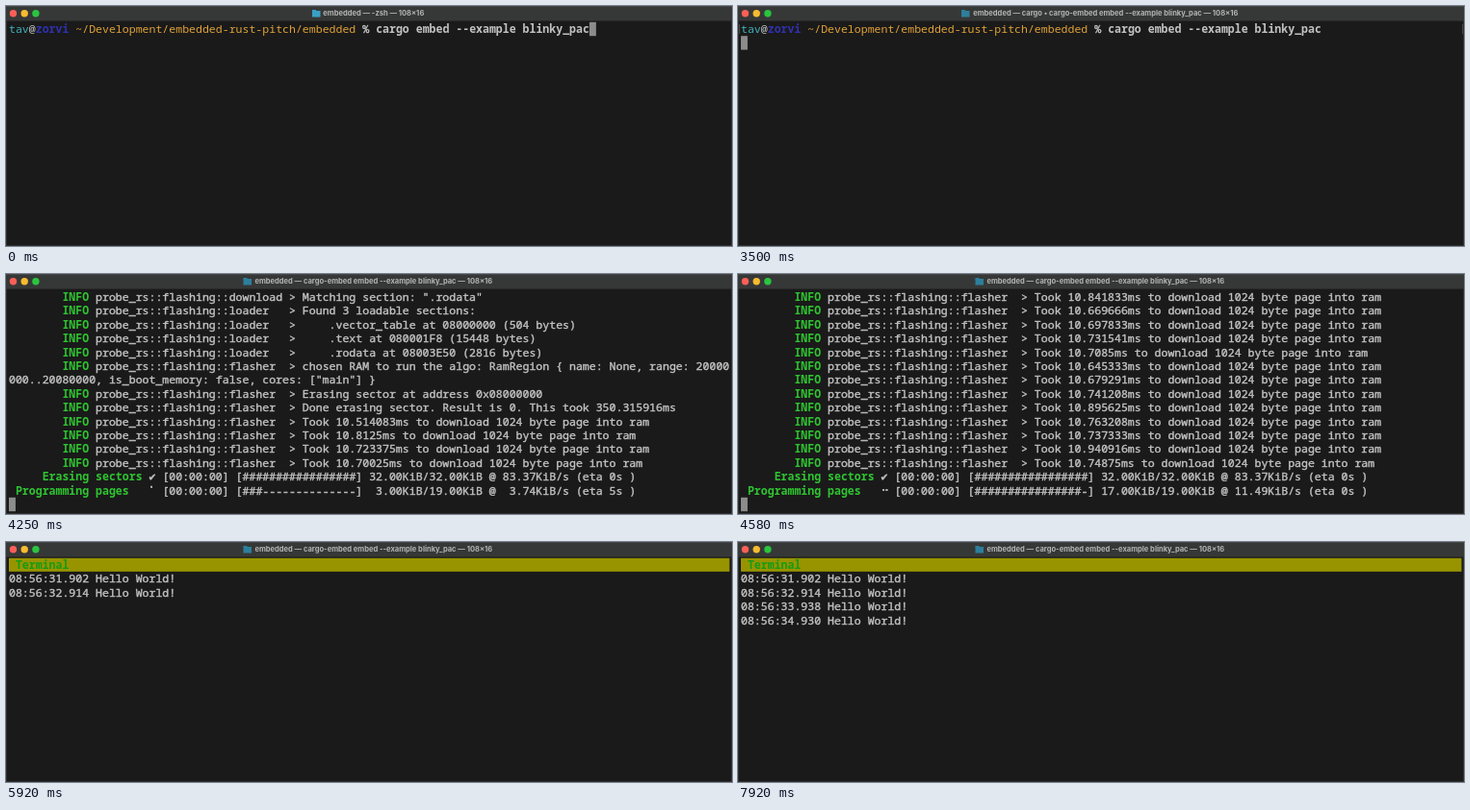
Recreate the animation shown at these times as an HTML page with a canvas. Size 754x250 px, loop 8000 ms.

```html
<!DOCTYPE html>
<html lang="en">
<head>
<meta charset="utf-8">
<title>Terminal session</title>
<style>
html, body { margin: 0; width: 100%; height: 100%; overflow: hidden; background: #1a1a1a; }
canvas { display: block; width: 754px; height: 250px; }
</style>
</head>
<body>
<canvas id="stage"></canvas>
<script>
const W = 754, H = 250, LOOP = 8000;
const ROWS = 16, LEFT = 3, TOP = 16.8, CELL = 6.93, LINE = 14.4;
const MONO = CELL / 0.6 + 'px "Noto Sans Mono", "DejaVu Sans Mono", monospace';
const C = {
  back: '#1a1a1a', bar: '#363837', text: '#c2c2c2', cursor: '#8c8c8c',
  user: '#3fb2bb', host: '#3030ae', path: '#e0a238', green: '#2fc431',
  olive: '#989400', head: '#149c14', title: '#b2b4b3'
};

const canvas = document.getElementById('stage');
const ctx = canvas.getContext('2d');
const dpr = window.devicePixelRatio || 1;
canvas.width = W * dpr;
canvas.height = H * dpr;

const seg = (text, color = C.text, weight = 500) => ({ text, color, weight });
const plain = text => [seg(text)];
const label = (name, width, rest) => [seg(name.padStart(width), C.green, 700), seg(rest)];
const info = (module, message) =>
  label('INFO', 12, ' ' + ('probe_rs::flashing::' + module).padEnd(28) + ' > ' + message);
const clamp = (v, lo, hi) => Math.max(lo, Math.min(hi, v));

const prompt = [
  seg('tav', C.user, 400), seg('@', C.text, 400), seg('zorvi', C.host, 700),
  seg(' ~/Development/embedded-rust-pitch/embedded', C.path, 400),
  seg(' % '), seg('cargo embed --example blinky_pac', C.text, 700)
];
const promptLength = prompt.reduce((n, s) => n + s.text.length, 0);

const log = [
  [3580, label('Finished', 12, ' dev [unoptimized + debuginfo] target(s) in 0.03s')],
  [3580, label('Config', 12, ' default')],
  [3580, label('Target', 12, ' target/thumbv7em-none-eabihf/debug/examples/blinky_pac')],
  [3665, info('download', 'Matching section: ".vector_table"')],
  [3665, info('download', 'Matching section: ".text"')],
  [3665, info('download', 'Matching section: ".rodata"')],
  [3665, info('loader', 'Found 3 loadable sections:')],
  [3665, info('loader', '    .vector_table at 08000000 (504 bytes)')],
  [3665, info('loader', '    .text at 080001F8 (15448 bytes)')],
  [3665, info('loader', '    .rodata at 08003E50 (2816 bytes)')],
  [3748, info('flasher', 'chosen RAM to run the algo: RamRegion { name: None, range: 20000')],
  [3748, plain('000..20080000, is_boot_memory: false, cores: ["main"] }')],
  [3748, info('flasher', 'Erasing sector at address 0x08000000')],
  [4080, info('flasher', 'Done erasing sector. Result is 0. This took 350.315916ms')]
];
const pageTimes = [
  10.514083, 10.8125, 10.723375, 10.70025, 10.688708, 10.841833, 10.669666,
  10.697833, 10.731541, 10.7085, 10.645333, 10.679291, 10.741208, 10.895625,
  10.763208, 10.737333, 10.940916, 10.74875, 10.712583, 10.726041
];
const hello = [
  [4830, '08:56:31.902'], [5670, '08:56:32.914'],
  [6750, '08:56:33.938'], [7750, '08:56:34.930']
];

function drawRow(row, segments) {
  const y = TOP + row * LINE + 11.2;
  let col = 0;
  for (const { text, color, weight } of segments) {
    const x = LEFT + col * CELL;
    ctx.font = (weight === 700 ? 700 : 400) + ' ' + MONO;
    ctx.fillStyle = ctx.strokeStyle = color;
    ctx.fillText(text, x, y);
    if (weight === 500) {
      // a thin outline gives the medium weight
      ctx.lineWidth = 0.4;
      ctx.lineJoin = 'round';
      ctx.strokeText(text, x, y);
    }
    col += text.length;
  }
}

function drawCursor(row, col) {
  ctx.fillStyle = C.cursor;
  ctx.fillRect(LEFT + col * CELL, TOP + row * LINE, CELL, LINE);
}

function drawTitle(text, iconX, iconColor) {
  ctx.fillStyle = C.bar;
  ctx.fillRect(0, 0, W, 15.5);
  ctx.fillStyle = '#4b4d4c';
  ctx.fillRect(0, 0, W, 0.7);
  ['#fb5f57', '#f8bb2f', '#2ac440'].forEach((color, i) => {
    ctx.fillStyle = color;
    ctx.beginPath();
    ctx.arc(7.5 + i * 11.7, 7.7, 3.7, 0, Math.PI * 2);
    ctx.fill();
  });
  ctx.fillStyle = iconColor;
  ctx.fillRect(iconX, 4, 4, 2);
  ctx.fillRect(iconX, 5, 8.5, 6.5);
  ctx.font = '700 7.55px Inter, sans-serif';
  ctx.fillStyle = C.title;
  ctx.textAlign = 'center';
  ctx.fillText(text, 381.8, 10.4);
  ctx.textAlign = 'left';
}

function progress(name, width, mark, done, total, rate, eta) {
  const part = done / total * 17;
  const filled = done ? Math.min(17, Math.floor(part) + 1) : 0;
  const size = n => n.toFixed(2).padStart(5) + 'KiB';
  const status = `${size(done)}/${size(total)} @ ${size(rate)}/s (eta ${eta}s )`;
  return [
    ...label(name, width, ' '.repeat(21 - width)),
    seg(mark),
    seg(` [00:00:00] [${'#'.repeat(filled).padEnd(17, '-')}] ${status}`)
  ];
}

function drawFlashing(t) {
  const step = Math.floor((t - 4249) / 82.5);
  const pages = clamp(Math.round(3 + 3.5 * step), 0, 19);
  const rows = [prompt, ...log.filter(([at]) => t >= at).map(([, line]) => line)];
  if (step >= -1) {
    for (const ms of pageTimes.slice(0, pages + 1)) {
      rows.push(info('flasher', `Took ${ms}ms to download 1024 byte page into ram`));
    }
  }
  if (t >= 3748) {
    const erased = Math.round(32 * clamp((t - 3748) / 332, 0, 1));
    const rate = pages ? 3.74 + (pages - 3) * 7.75 / 14 : 0;
    const eta = pages ? Math.floor((19 - pages) / rate + 0.8) : 0;
    const spin = '⠁⠁⠉⠙⠚⠒⠂'[clamp(step + 1, 0, 6)];
    rows.push(progress('Erasing sectors', 20, erased < 32 ? '⠁' : '✔', erased, 32, 83.37, 0));
    rows.push(progress('Programming pages', 18, spin, pages, 19, rate, eta));
  }
  const view = rows.slice(-(ROWS - 1));
  view.forEach((line, i) => drawRow(i, line));
  drawCursor(view.length, 0);
  if (view[0] === prompt) {
    ctx.fillStyle = '#505050';
    ctx.fillRect(1, 19, 0.8, 10);
    ctx.fillRect(752, 19, 0.8, 10);
  }
}

function drawMonitor(t) {
  ctx.fillStyle = C.olive;
  ctx.fillRect(LEFT, TOP, 108 * CELL, LINE - 0.4);
  drawRow(0, [seg(' Terminal', C.head, 700)]);
  hello.forEach(([at, stamp], i) => {
    if (t >= at) drawRow(i + 1, plain(stamp + ' Hello World!'));
  });
}

function draw(t) {
  ctx.setTransform(dpr, 0, 0, dpr, 0, 0);
  ctx.fillStyle = C.back;
  ctx.fillRect(0, 0, W, H);

  const command = 'cargo-embed embed --example blinky_pac — 108×16';
  if (t < 3500) drawTitle('embedded — -zsh — 108×16', 318, '#3a9fc4');
  else if (t < 3665) drawTitle('embedded — cargo • ' + command, 232, '#2d7f9c');
  else drawTitle('embedded — ' + command, 246.5, '#2d7f9c');

  if (t < 3420) {
    drawRow(0, prompt);
    drawCursor(0, promptLength);
  } else if (t < 4748) {
    drawFlashing(t);
  } else {
    drawMonitor(t);
  }

  ctx.fillStyle = '#3a3a3a';
  ctx.fillRect(0, 15, 0.7, H);
  ctx.fillRect(W - 0.7, 15, 0.7, H);
  ctx.fillRect(0, H - 0.7, W, 0.7);
}

function tick() {
  draw(performance.now() % LOOP);
  requestAnimationFrame(tick);
}
tick();
</script>
</body>
</html>
```
